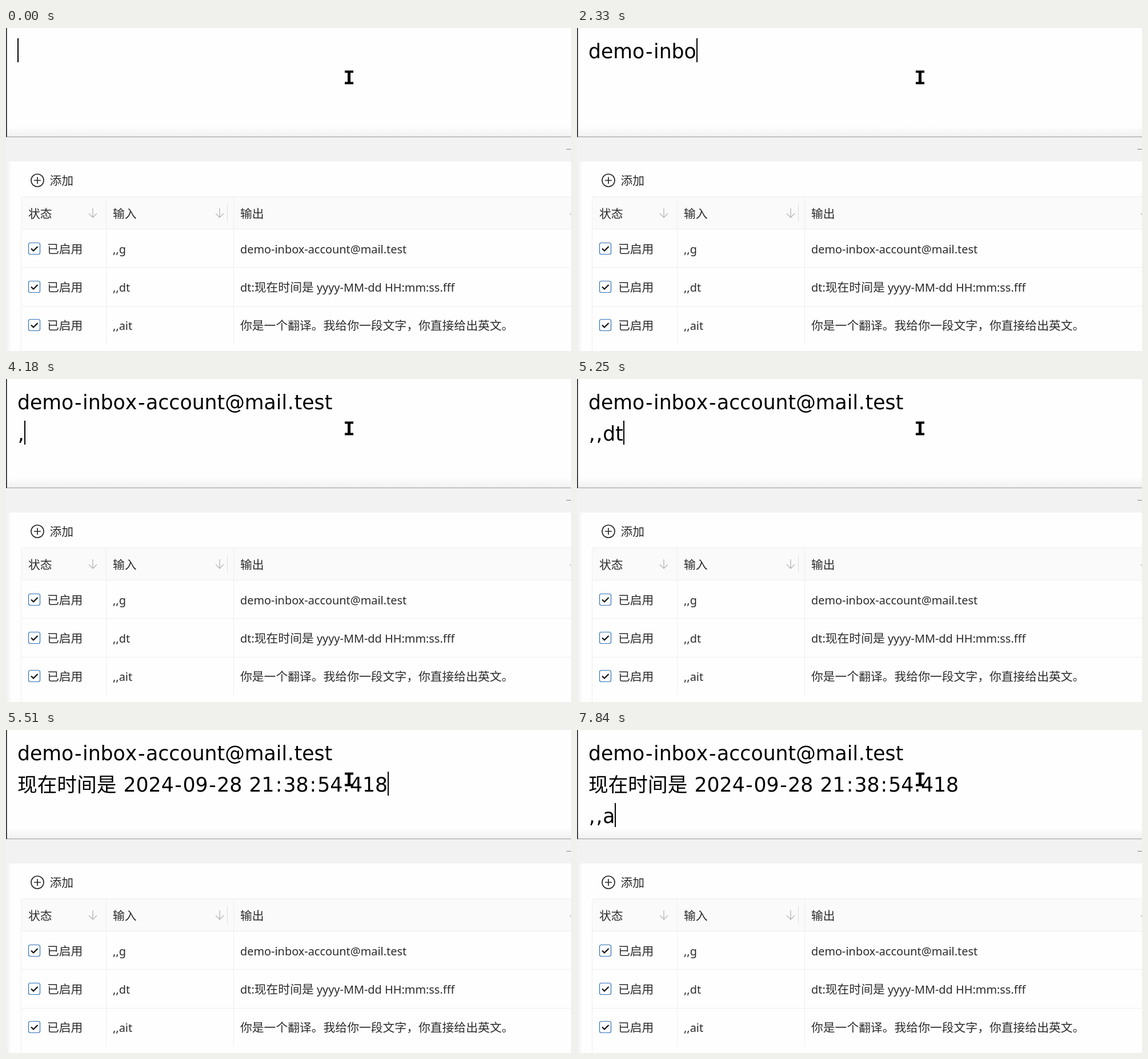
Write an HTML page that moves like this. It is 989x566 px and loops after 8 s.

```html
<!DOCTYPE html>
<html lang="zh-CN">
<head>
<meta charset="utf-8">
<title>Text expansion</title>
<style>
  html, body { margin: 0; width: 100%; height: 100%; overflow: hidden; background: #fefefe; }
  svg { position: absolute; left: 0; top: 0; display: block; }
  .ui text { font: 20.8px "Noto Sans CJK SC", "Noto Sans CJK", sans-serif; fill: #2b2b2b; }
  .ui .latin { font: 19.9px "Noto Sans", "Open Sans", sans-serif; }
  .line {
    position: absolute; left: 20px; height: 42px; white-space: pre; color: #000;
    font: 34.67px/42px "DejaVu Sans", "Noto Sans CJK SC", "Noto Sans CJK", sans-serif;
    font-kerning: none;
  }
  .caret {
    display: inline-block; position: relative; left: -.3px; top: -2px; vertical-align: top;
    width: 2px; height: 42px; margin-right: -2px; background: #000;
  }
  /* roomier punctuation */
  .dash { padding: 0 .0465em; }
  .colon { padding: 0 .0585em; }
  .stop { padding: 0 .023em; }
  .gap { padding: 0 .017em; }
</style>
</head>
<body>
<svg class="ui" width="989" height="566" viewBox="0 0 989 566">
  <defs>
    <linearGradient id="above" x2="0" y2="1">
      <stop offset="0" stop-color="#fefefe"/><stop offset="1" stop-color="#f1f1f1"/>
    </linearGradient>
    <linearGradient id="side">
      <stop offset="0" stop-color="#efefef"/><stop offset="1" stop-color="#fefefe"/>
    </linearGradient>
    <path id="arrow" d="M0 -8V8M-7 1L0 8L7 1" fill="none" stroke="#b9b9b9" stroke-width="1.4"/>
    <g id="check" fill="none">
      <rect x="39.5" y="-10.5" width="20" height="20" rx="3" fill="#fff" stroke="#2f70b8" stroke-width="1.2"/>
      <path d="M44 -.5L48 3.5L55.5 -4" stroke="#111" stroke-width="2.2"/>
    </g>
  </defs>
  <rect width="989" height="566" fill="#fefefe"/>
  <rect y="172" width="989" height="18" fill="url(#above)"/>
  <rect y="190" width="989" height="44" fill="#f2f2f2"/>
  <rect y="190" width="989" height="1.4" fill="#b0b0b0"/>
  <rect width="1.6" height="191" fill="#1c1c1c"/>
  <rect x="981" y="212" width="8" height="1" fill="#808080"/>
  <rect y="234" width="9" height="332" fill="url(#side)"/>

  <g fill="none" stroke="#2b2b2b" stroke-width="1.7">
    <circle cx="55" cy="267" r="11"/><path d="M49 267H61M55 261V273"/>
  </g>
  <path d="M26.5 353V299Q26.5 295.5 30 295.5H989V353Z" fill="#fafafa"/>
  <path d="M26.5 566V299Q26.5 295.5 30 295.5H989M27 352.5H989M27 419.5H989M27 487.5H989M175.5 296V554M398.5 296V554"
        fill="none" stroke="#eee"/>
  <path d="M387.5 309V339" stroke="#dedede"/>
  <use href="#arrow" x="152" y="324"/>
  <use href="#arrow" x="374" y="324"/>
  <use href="#arrow" x="994" y="324"/>
  <g id="table"></g>
</svg>
<div id="editor"></div>
<svg width="989" height="566" viewBox="0 0 989 566">
  <path d="M593 74.5H608V78.5H603V94.5H608V98.5H593V94.5H598V78.5H593Z" fill="#000"/>
</svg>
<script>
const PERIOD = 8000;
const MAIL = 'demo-inbox-account@mail.test';
const CLOCK = '现在时间是 2024-09-28 21:38:54.418';

const table = document.getElementById('table');
const editor = document.getElementById('editor');

function label(x, y, text) {
  const el = document.createElementNS('http://www.w3.org/2000/svg', 'text');
  el.setAttribute('x', x);
  el.setAttribute('y', y);
  el.innerHTML = text.replace(/[ -~]+/g, '<tspan class="latin">$&</tspan>');
  table.append(el);
}

label(76.5, 275, '添加');
label(39, 332.5, '状态');
label(187, 332.5, '输入');
label(410, 332.5, '输出');

[
  [',,g', MAIL],
  [',,dt', 'dt:现在时间是 yyyy-MM-dd HH:mm:ss.fff'],
  [',,ait', '你是一个翻译。我给你一段文字，你直接给出英文。']
].forEach(([input, output], i) => {
  const y = 387 + i * 67;
  table.insertAdjacentHTML('beforeend', `<use href="#check" y="${y}"/>`);
  label(72, y + 8, '已启用');
  label(187, y + 8, input);
  label(410, y + 8, output);
});

// time, line, text on that line, caret shown
const steps = [
  [0, 0, '', 1], [330, 0, '', 0], [860, 0, '', 1],
  [1390, 0, ',', 1], [1790, 0, ',,', 1], [2260, 0, ',,g', 1],
  [2330, 0, MAIL.slice(0, 9), 1], [2390, 0, MAIL.slice(0, 19), 1],
  [2460, 0, MAIL, 1], [2980, 0, MAIL, 0],
  [3240, 1, '', 1], [3770, 1, '', 0],
  [4180, 1, ',', 1], [4580, 1, ',,', 1], [4840, 1, ',,d', 1], [5250, 1, ',,dt', 1],
  [5320, 1, CLOCK.slice(0, 11), 1], [5380, 1, CLOCK.slice(0, 20), 1],
  [5450, 1, CLOCK.slice(0, 28), 1], [5510, 1, CLOCK, 1], [6040, 1, CLOCK, 0],
  [6180, 2, '', 1], [6710, 2, '', 0],
  [7040, 2, ',', 1], [7440, 2, ',,', 1], [7840, 2, ',,a', 1]
];

const lines = [0, 1, 2].map(i => {
  const el = document.createElement('div');
  el.className = 'line';
  el.style.top = 20 + i * 55 + 'px';
  editor.append(el);
  return el;
});

const spacing = { '-': 'dash', ':': 'colon', '.': 'stop', ',': 'stop', ' ': 'gap' };
const markup = text => text.replace(/[-:., ]/g, c => `<span class="${spacing[c]}">${c}</span>`);

let shown = -1;

function draw(time) {
  const k = steps.findLastIndex(s => s[0] <= time);
  if (k === shown) return;
  shown = k;
  const [, row, text, caret] = steps[k];
  const content = [MAIL, CLOCK, ''].map((done, i) => i < row ? done : i === row ? text : '');
  lines.forEach((el, i) => {
    el.innerHTML = markup(content[i]) + (caret && i === row ? '<span class="caret"></span>' : '');
  });
}

const start = performance.now();
function tick() {
  draw((performance.now() - start) % PERIOD);
  requestAnimationFrame(tick);
}
tick();
</script>
</body>
</html>
```
